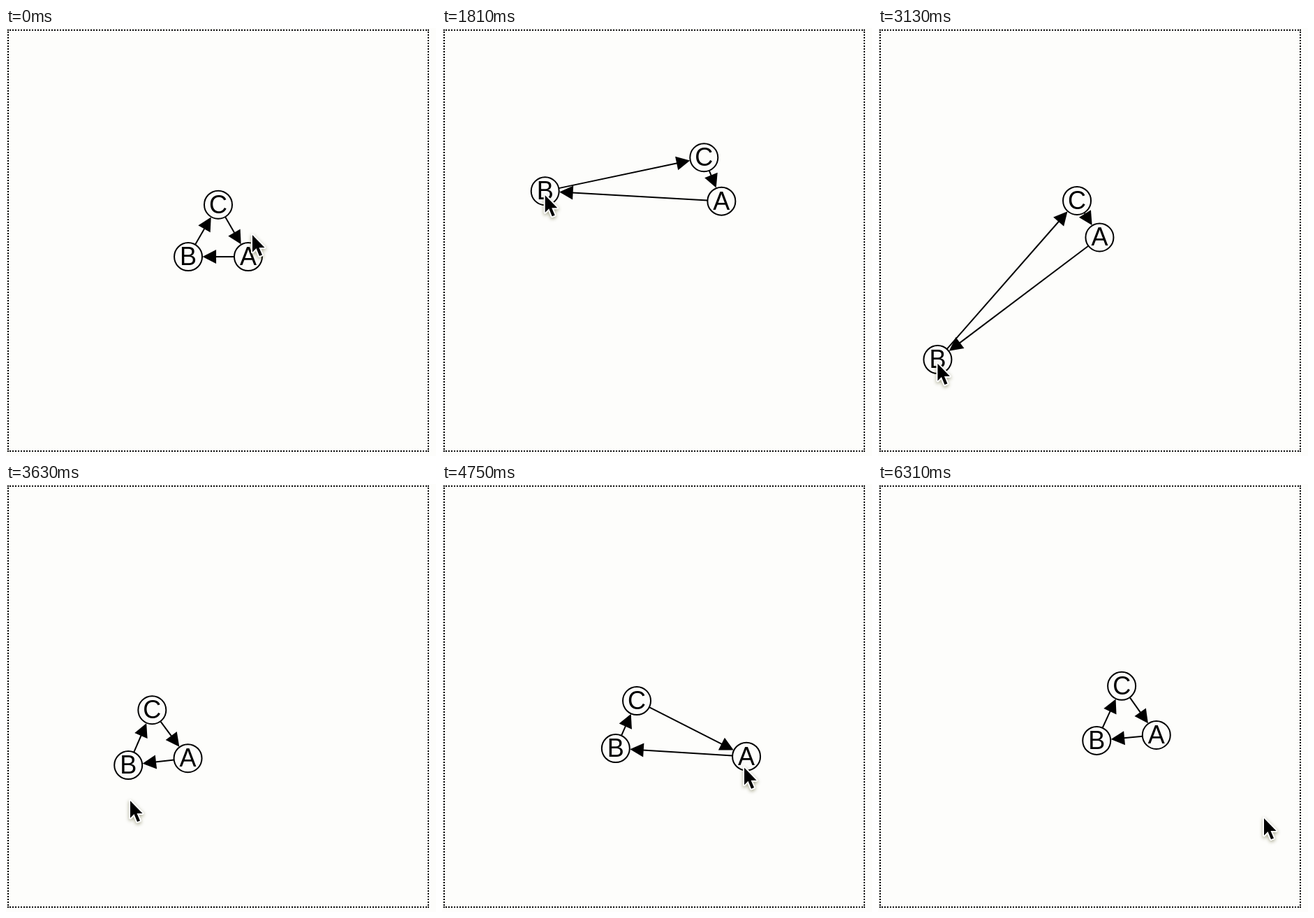
Animation of 616x612 px, one loop 6.37 s. Source, as an HTML page with a canvas:

```html
<!DOCTYPE html>
<html lang="en">
<head>
<meta charset="utf-8">
<title>Draggable graph</title>
<style>
html, body { margin: 0; width: 100%; height: 100%; overflow: hidden; background: #fdfdfb; }
canvas { display: block; }
#frame {
  position: absolute; left: 2px; top: 2px; width: 604px; height: 604px;
  box-sizing: border-box; border: 2px dotted #000;
}
</style>
</head>
<body>
<canvas id="stage" width="616" height="612"></canvas>
<div id="frame"></div>
<script>
const ctx = document.getElementById('stage').getContext('2d');
const PAPER = '#fdfdfb', INK = '#000';
const LOOP = 6370, STEP = 62.5;                 // time in ms, motion in ticks of STEP
const RADIUS = 20, HEAD = 19.5, SPREAD = 49.6;  // node, arrowhead, triangle
const CENTRE = [304, 302.3], GRAVITY = 0.0406;  // pull to the centre per tick
const SQUEEZE = 0.0019;                         // how far stretching narrows the free pair
const RECOIL = 4, REACH = 5;                    // ticks to spring back, to reach a node
const START = [353, 296];

// Each drag pulls one node by `stretch` and moves the triangle to `offset` from the centre.
const drags = [
  { node: 2, from: 11, peak: 18, release: 21, stretch: [84, -77], offset: [100, -135],
    tilt: 12, grip: [8, 0], idle: [430, 130], overText: true },
  { node: 1, from: 26, peak: 31, release: 32, stretch: [-141, -9], offset: [-38.5, -64],
    tilt: 6, grip: [0, 6], idle: [236, 335] },
  { node: 1, from: 46, peak: 53, release: 53, stretch: [-130, 138], offset: [-109, 86],
    tilt: -6.6, grip: [0, 6], idle: [178, 453] },
  { node: 0, from: 72, peak: 81, release: 81, stretch: [108, 16], offset: [112, 81],
    tilt: -5.3, grip: [-3, 16], idle: [553, 478] }
];

const clamp = u => Math.max(0, Math.min(1, u));
const smooth = u => (u = clamp(u), u * u * (3 - 2 * u));
const add = (a, b, s = 1) => a.map((v, i) => v + b[i] * s);
const mix = (a, b, u) => a.map((v, i) => v + (b[i] - v) * u);
const settle = (offset, ticks) =>
  offset.map(v => v * Math.exp(-GRAVITY * Math.max(0, ticks)));

function nodesAt(k) {
  let offset = [0, 0], stretch = [0, 0], tilt = 0, since = 0, held = 0;
  for (const d of drags.filter(d => d.from <= k)) {
    const p = clamp((k - d.from) / (d.peak - d.from)), e = smooth(p);
    const pull = Math.sin(p * Math.PI / 2) * (1 - smooth((k - d.release) / RECOIL));
    offset = mix(settle(offset, d.from - since), d.offset, e);
    stretch = d.stretch.map(v => v * pull);
    tilt += (d.tilt - tilt) * e;
    since = d.release;
    held = d.node;
  }
  const mean = add(CENTRE, settle(offset, k - since));
  const corners = [30, 150, 270].map(deg => {
    const angle = (deg + tilt) * Math.PI / 180;
    return [SPREAD * Math.cos(angle), SPREAD * Math.sin(angle)];
  });
  const middle = corners[held].map(v => -v / 2);
  const narrow = Math.hypot(...stretch) * SQUEEZE;
  return corners.map((corner, i) => add(mean, i === held
    ? add(corner, stretch)
    : add(mix(corner, middle, narrow), stretch, -0.5)));
}

function pointerAt(k) {
  const last = drags.filter(d => d.from <= k).pop();
  const next = drags.find(d => d.from > k);
  const gripAt = (d, tick) => add(nodesAt(tick)[d.node], d.grip);
  if (last && k <= last.release) return gripAt(last, k);
  let place = START;
  if (last) place = mix(gripAt(last, last.release), last.idle, smooth((k - last.release) / RECOIL));
  if (next) place = mix(place, gripAt(next, next.from), smooth((k - next.from) / REACH + 1));
  return place;
}

function drawEdge([x1, y1], [x2, y2]) {
  const tip = Math.hypot(x2 - x1, y2 - y1) - RADIUS - 0.5;
  ctx.save();
  ctx.translate(x1, y1);
  ctx.rotate(Math.atan2(y2 - y1, x2 - x1));
  ctx.beginPath();
  ctx.moveTo(RADIUS, 0);
  ctx.lineTo(tip - HEAD + 1, 0);
  ctx.stroke();
  ctx.beginPath();
  ctx.moveTo(tip, 0);
  ctx.lineTo(tip - HEAD, -10);
  ctx.lineTo(tip - HEAD, 10);
  ctx.fill();
  ctx.restore();
}

function drawNode([x, y], label) {
  ctx.beginPath();
  ctx.arc(x, y, RADIUS, 0, 2 * Math.PI);
  ctx.fillStyle = PAPER;
  ctx.fill();
  ctx.stroke();
  ctx.fillStyle = INK;
  ctx.fillText(label, x, y + 12);
}

const arrow = new Path2D('M0 0V24.5L5.5 19L10 30L14 28.4L9.5 18H17.5Z');
const beam = new Path2D('M-6-15Q0-15 0-10Q0-15 6-15M0-10V10M-6 15Q0 15 0 10Q0 15 6 15M-3 1H3');

function drawPointer([x, y], overText) {
  const shape = overText ? beam : arrow;
  ctx.save();
  ctx.translate(x, y);
  ctx.lineJoin = 'round';
  ctx.strokeStyle = '#fff';
  ctx.lineWidth = overText ? 5 : 4;
  if (!overText) {
    ctx.shadowColor = 'rgba(70, 70, 20, .45)';
    ctx.shadowBlur = 5;
    ctx.shadowOffsetY = 2;
  }
  ctx.stroke(shape);
  ctx.shadowColor = 'transparent';
  if (overText) {
    ctx.strokeStyle = INK;
    ctx.lineWidth = 2;
    ctx.stroke(shape);
  } else {
    ctx.fill(shape);
  }
  ctx.restore();
}

function draw(time) {
  const k = Math.min(101, Math.floor((time % LOOP + 4) / STEP));
  ctx.fillStyle = PAPER;
  ctx.fillRect(0, 0, 616, 612);
  ctx.fillStyle = ctx.strokeStyle = INK;
  ctx.lineWidth = 2;
  ctx.font = '36px "Liberation Sans", Arial, sans-serif';
  ctx.textAlign = 'center';

  const nodes = nodesAt(k);
  nodes.forEach((node, i) => drawEdge(node, nodes[(i + 1) % 3]));
  nodes.forEach((node, i) => drawNode(node, 'ABC'[i]));
  drawPointer(pointerAt(k), drags.some(d => d.overText && k >= d.from && k <= d.release));
}

const start = performance.now();
function tick() {
  draw(performance.now() - start);
  requestAnimationFrame(tick);
}
tick();
</script>
</body>
</html>
```
